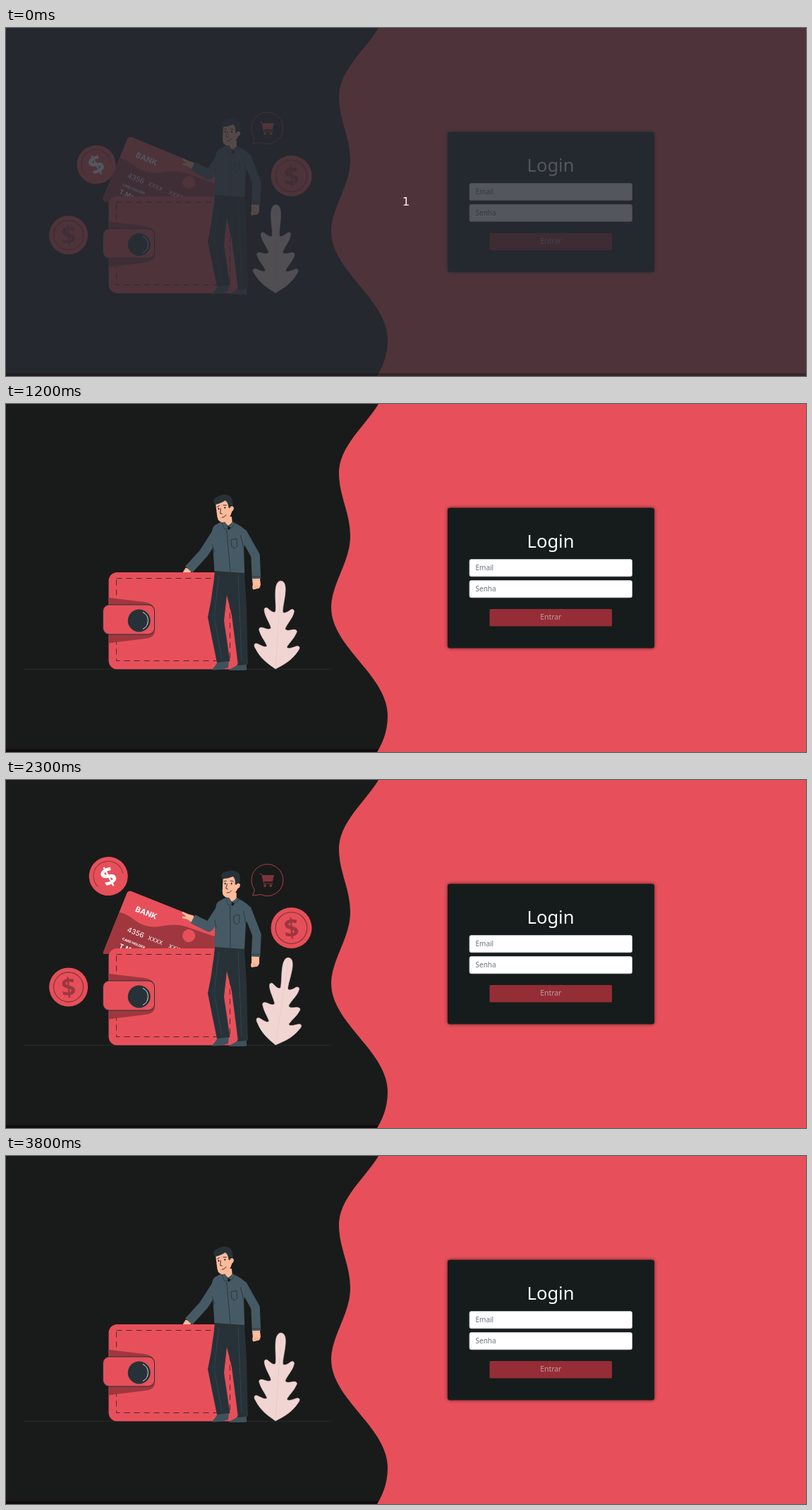
Animation of 1134 by 494 pixels, one loop 3900 ms. Source, as an HTML page:

```html
<!DOCTYPE html>
<html lang="pt">
<head>
<meta charset="utf-8">
<title>Login</title>
<style>
  html, body { margin: 0; width: 100%; height: 100%; overflow: hidden; background: #191b1a; }
  svg { display: block; width: 100vw; height: 100vh; }
  text { font-family: "Noto Sans", "Open Sans", sans-serif; }
  .red { fill: #e7505a; }
  .wine { fill: #a0373f; }
  .navy { fill: #263238; }
  .shirt { fill: #455a64; }
  .skin { fill: #ffbb9b; }
  .white { fill: #fff; }
  .hint { fill: #6c757d; font-size: 10px; }
  .line { fill: none; stroke: #263238; stroke-width: .8; }
  .sleeve { fill: none; stroke: #455a64; stroke-width: 13.5; stroke-linejoin: round; }
  .card text { font-family: Inter, sans-serif; fill: #fff; }
  .sign { font-family: "Open Sans", sans-serif; font-weight: 700; text-anchor: middle; }
</style>
</head>
<body>
<svg viewBox="0 0 1134 494" preserveAspectRatio="none">
  <defs>
    <clipPath id="overWallet"><rect width="1134" height="247"/></clipPath>
    <clipPath id="art"><rect y="84" width="1134" height="410"/></clipPath>
    <filter id="shadow" x="-10%" y="-10%" width="120%" height="120%">
      <feDropShadow dx="0" dy="0" stdDeviation="2.5" flood-color="#000" flood-opacity=".65"/>
    </filter>
    <path id="leaf" d="M0-125C5-125 7-119 7-111C7-100 5-92 5-83C5-78 10-80 15-84C18-87 22-86 21-82C20-74 13-66 10-58C11-54 17-56 21-57C26-58 28-56 26-52C23-44 17-38 14-32C16-28 22-32 28-34C33-35 33-31 30-27C22-13 10-6 0 0Z"/>
  </defs>

  <rect width="1134" height="494" fill="#191b1a"/>
  <rect y="490" width="540" height="4" fill="#0e0b0f"/>
  <path class="red" d="M528 0C510 30 472 60 472 98C472 130 488 155 488 187C488 225 461 255 461 289C461 345 541 385 541 443C541 465 533 483 526 494H1134V0Z"/>

  <!-- login form -->
  <rect x="626" y="147.500" width="293" height="199" rx="3" fill="#191b1a" filter="url(#shadow)"/>
  <text class="white" x="772" y="204" font-size="25.500" font-weight="500" text-anchor="middle">Login</text>
  <g fill="#fff" stroke="#ced4da" stroke-width=".7">
    <rect x="657" y="220.500" width="230.500" height="24.300" rx="2.500"/>
    <rect x="657" y="250.500" width="230.500" height="24.300" rx="2.500"/>
  </g>
  <text class="hint" x="665.500" y="236">Email</text>
  <text class="hint" x="665.500" y="266">Senha</text>
  <rect x="685.500" y="291" width="173.500" height="24.500" rx="2" fill="#952d36"/>
  <text x="772.300" y="306.300" font-size="10.300" fill="#bba1a4" text-anchor="middle">Entrar</text>

  <!-- illustration -->
  <path d="M25 376.500H461" stroke="#252a2a" stroke-width="1"/>

  <g id="bubble">
    <path d="M361 162.500A22.500 22.500 0 1 0 352 155Q352.500 159 349.500 164Q355 163.500 361 162.500Z" fill="none" stroke="#b9444d" stroke-width=".9"/>
  </g>
  <g id="cart" class="red">
    <path d="M359.500 133.300H362.500L365.500 147H378.500" fill="none" stroke="#e7505a" stroke-width="1"/>
    <path d="M363 135H380L377.800 144.300H365Z"/>
    <circle cx="367" cy="150" r="1.900"/><circle cx="375.300" cy="150" r="1.900"/>
  </g>

  <g id="coins">
    <g transform="translate(404.500 210)">
      <circle class="red" r="29"/>
      <circle r="22.300" fill="none" stroke="#8f343c" stroke-width="1.300"/>
      <text class="sign wine" y="13.500" font-size="37" transform="rotate(-5)">$</text>
    </g>
    <g transform="translate(88.600 294)">
      <circle class="red" r="27.500"/>
      <circle r="21" fill="none" stroke="#8f343c" stroke-width="1.300"/>
      <text class="sign wine" y="13" font-size="36" transform="rotate(-5)">$</text>
    </g>
  </g>

  <g clip-path="url(#overWallet)">
    <g id="card" class="card">
      <rect class="red" width="148" height="99" rx="5"/>
      <path class="wine" d="M0 34C14 31 24 38 38 38C62 38 68 20 95 18C115 16 130 18 148 14V99H5Q0 99 0 94Z"/>
      <circle class="red" cx="104" cy="28.500" r="9"/>
      <text x="20" y="24.500" font-size="11" font-weight="700">BANK</text>
      <text x="20" y="55.500" font-size="10">4356</text>
      <text x="51.500" y="55" font-size="8">XXXX</text>
      <text x="83" y="55" font-size="8">XXXX</text>
      <text x="18" y="69" font-size="4.800" font-weight="700">CARD HOLDER</text>
      <text x="18" y="81" font-size="9" font-weight="700">T.Morn</text>
    </g>
  </g>

  <g clip-path="url(#art)">
    <g id="roller">
      <circle class="red" r="27.500"/>
      <path d="M-20 6A21 21 0 1 1 20 6" fill="none" stroke="#a0373f" stroke-width="1.200"/>
      <text class="sign white" y="13" font-size="36">$</text>
    </g>
  </g>

  <g id="hand">
    <path class="skin" d="M1-5L-6-7L-14-11L-15-9L-9-4L-15-4L-15-2L-8 0L-2 4L2 4Z"/>
  </g>
  <path id="armL" class="sleeve"/>

  <!-- wallet -->
  <rect class="red" x="145.500" y="239" width="184" height="137.500" rx="12"/>
  <rect x="156.500" y="247.500" width="161" height="117" fill="none" stroke="#4b292f" stroke-width="1" stroke-dasharray="8 6"/>
  <path class="wine" d="M145.500 275L196 281Q211 283 211 295V322Q211 331 198 333L145.500 339.500Z"/>
  <rect class="red" x="137.500" y="285" width="73" height="42" rx="9" stroke="#263238" stroke-width="1"/>
  <circle class="navy" cx="188.700" cy="307.500" r="16"/>
  <path d="M194 295.500A13.500 13.500 0 0 1 194 319.500" fill="none" stroke="#f1d5d2" stroke-width="1"/>

  <!-- plant -->
  <g id="plant" fill="#f1d5d2" stroke="#f1d5d2" stroke-width=".6">
    <use href="#leaf"/><use href="#leaf" transform="scale(-1 1)"/>
  </g>

  <!-- man -->
  <path d="M291 377.500Q297 373 300 365H316L315 374Q306 378 291 377.500ZM315 378L329 370H341L341 378Z" fill="#3f525c"/>
  <path class="navy" d="M296 237Q293 270 286 303L299 367L317.500 365L309 308L313 271L320 300L329 371L343 370L341 290L338 238Z"/>
  <path d="M302 243Q298 275 295 303L306 362M329 243L334 365" fill="none" stroke="#3d5059" stroke-width=".6"/>
  <g id="handR">
    <path class="skin" d="M-6-2H5V9Q3 15 0 14L-6 15Q-8 13-6 8Z"/>
    <path d="M-3 9V13M0 10V13" stroke="#c98068" stroke-width=".5"/>
  </g>
  <path id="armR" class="sleeve" style="stroke-width:12.500px"/>
  <path id="seamR" class="line"/>
  <g id="torso">
    <path class="shirt" d="M312 167L302 172Q297 175 297 186L295.500 237L338 240L340 205L347 182Q343 175 329 168Z"/>
    <path class="line" d="M318 178V238M296 199L298 211M340 205L337 186"/>
    <path class="line" d="M323 193L331 191L331 202L327 205L323 202Z"/>
    <path class="skin" d="M314 160H327L327 169L320 173L314 168Z"/>
    <path d="M316 170L321 173L329 171L321 179Z" fill="#111718"/>
    <path class="shirt" d="M312 166L316 167L321 175L315 178ZM328 167L331 170L325 176L321 174Z" stroke="#263238" stroke-width=".6"/>
  </g>
  <g id="head">
    <path class="skin" d="M-11-30L-12-10Q-12-2-5-1Q3-1 7-9L10-14Q14-16 13-20Q11-23 8-20L7-32Z"/>
    <path class="navy" d="M-13-30Q-14-37-7-38Q4-42 11-36Q15-31 12-21Q9-24 8-19L6-20Q7-28 3-31Q-4-28-9-28L-12-27Z"/>
    <path d="M-10-24L-6-25M-1-25L4-24M-5-21L-7-14L-4-13M-6-8Q-2-7 1-11" fill="none" stroke="#3a2b2b" stroke-width=".9"/>
    <ellipse class="navy" cx="-8" cy="-21" rx="1" ry="1.500"/><ellipse class="navy" cx="1" cy="-21" rx="1" ry="1.500"/>
  </g>

  <g id="cover">
    <rect width="1134" height="494" fill="#282c34" fill-opacity=".8"/>
    <rect y="490" width="1134" height="4" fill="#1a1216" fill-opacity=".4"/>
    <text x="567" y="252" font-size="16.500" fill="#fff0e8" text-anchor="middle" style="font-family:'DejaVu Sans',sans-serif">1</text>
  </g>
</svg>
<script>
const LOOP = 3900, STEP = 100, SCENE = 2590, OFFSET = 1485;
const $ = id => document.getElementById(id);
const el = {};
for (const n of document.querySelectorAll("svg [id]")) el[n.id] = n;

const clamp = v => Math.min(1, Math.max(0, v));
const ramp = (t, a, b) => clamp((t - a) / (b - a));
const mix = (a, b, p) => a + (b - a) * p;
const ease = p => (1 - Math.cos(Math.PI * p)) / 2;
const set = (n, v) => el[n].setAttribute("transform", v);

// rows of [time, value, value, ...]
function track(rows, t) {
  let i = 1;
  while (i < rows.length - 1 && rows[i][0] < t) i++;
  const a = rows[i - 1], b = rows[i], p = ramp(t, a[0], b[0]);
  return a.slice(1).map((v, k) => mix(v, b[k + 1], p));
}

const ROLL = [ // x, y, turn
  [0, 216, -100, -28], [1485, 128, 194, -28], [1585, 118, 199, -13],
  [1690, 108, 203.5, -8], [1795, 100.5, 206.3, -5], [1950, 98.500, 207, -4]
];
const SWAY = [
  [0, 2.8], [105, 3.7], [495, 7.8], [895, 12], [1000, 12], [1195, 8.7], [1495, 0],
  [1585, -2.3], [1700, -4], [1830, -4.6], [1960, -3.5], [2085, -1], [2285, 2.8]
];

function limb(from, to, p) {
  return from.map((v, i) => mix(v, to[i], p));
}
const poly = q => `M${q[0]} ${q[1]}L${q[2]} ${q[3]}L${q[4]} ${q[5]}`;

function draw(time) {
  const u = (time + OFFSET) % SCENE;
  const p = ease(ramp(u, 500, 1290));

  el.cover.style.display = time < STEP ? "" : "none";
  el.coins.setAttribute("opacity", ramp(u, 380, 1200));
  el.cart.setAttribute("opacity", ramp(u, 1000, 1400));
  const s = ramp(u, 105, 560);
  set("bubble", `translate(349.5 164) scale(${s}) translate(-349.5 -164)`);

  const [x, y, turn] = track(ROLL, u);
  set("roller", `translate(${x} ${y}) rotate(${turn})`);
  set("plant", `translate(382 376) rotate(${track(SWAY, u)[0]})`);
  set("card", `translate(${mix(148, 174, p)} ${mix(241, 153, p)}) rotate(${mix(.5, 22.5, p)})`);

  const k = mix(.09, 0, p);
  set("torso", `matrix(1 0 ${k} 1 ${-238 * k} 0)`);
  set("head", `translate(${mix(313, 319, p)} 168) rotate(${mix(-10, 0, p)})`);

  const left = limb([300, 181, 280, 212, 259, 235], [306, 181, 288, 208.5, 265, 196], p);
  el.armL.setAttribute("d", poly(left));
  set("hand", `translate(${left[4]} ${left[5]}) rotate(${mix(-75, 0, p)})`);

  const right = limb([335, 182, 353.5, 215, 355, 248], [341, 182, 355.5, 220, 354, 251], p);
  el.armR.setAttribute("d", poly(right));
  el.seamR.setAttribute("d", `M${right[4] - 6} ${right[5] - 3}h12`);
  set("handR", `translate(${right[4]} ${right[5]}) rotate(${mix(-6, 0, p)})`);
}

const start = performance.now();
function tick() {
  const t = (performance.now() - start) % LOOP;
  draw(Math.floor(t / STEP) * STEP);
  requestAnimationFrame(tick);
}
tick();
</script>
</body>
</html>
```
